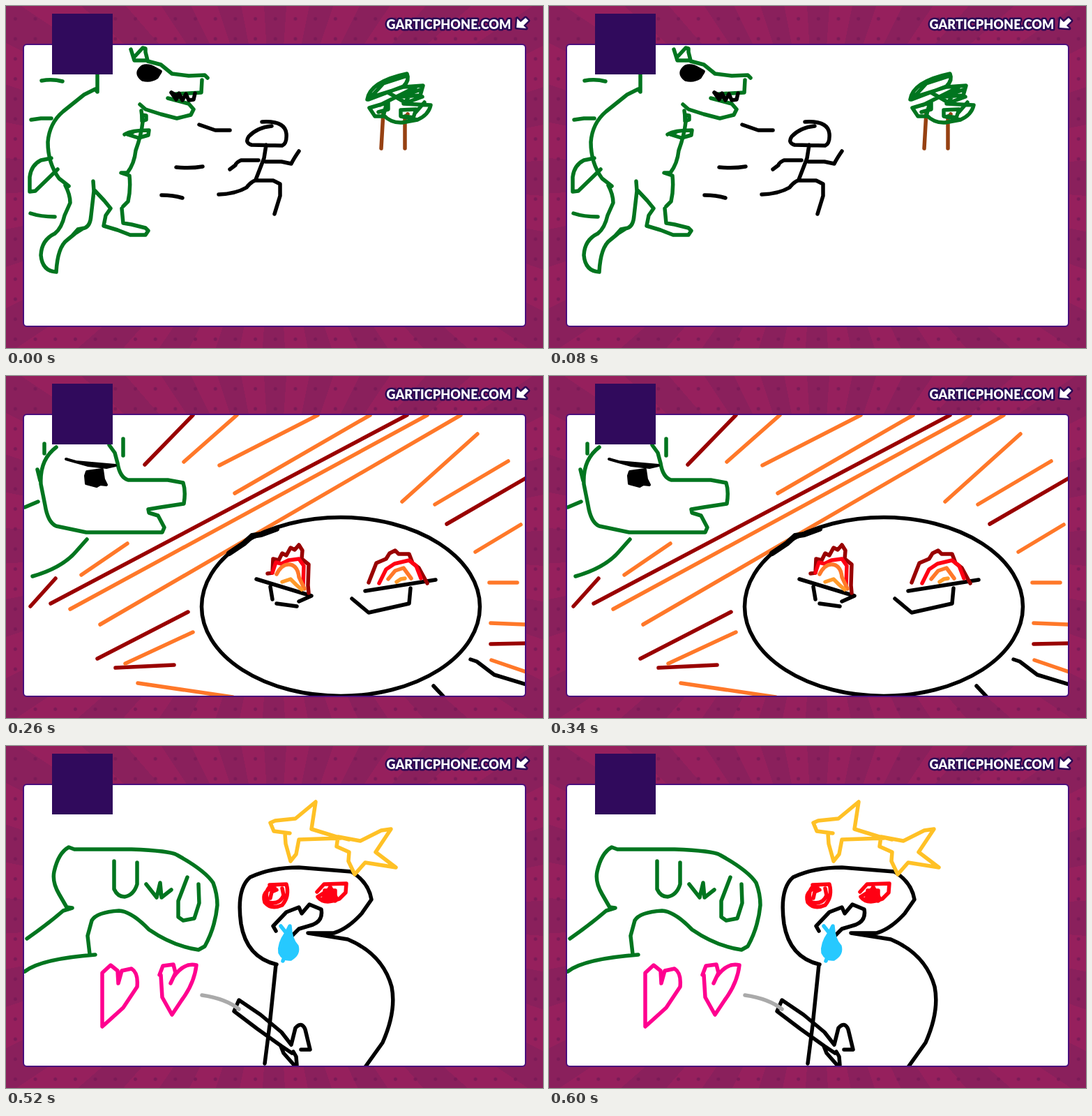
Animation of 770 by 490 pixels, one loop 650 ms. Source, as an HTML page:

```html
<!DOCTYPE html>
<html lang="en">
<head>
<meta charset="utf-8">
<title>Flipbook chase</title>
<style>
html, body { margin: 0; width: 770px; height: 490px; overflow: hidden; }
body {
  background:
    radial-gradient(circle, #7a1b57 2px, transparent 3px) -1px 4px / 28.7px 28.7px,
    repeating-conic-gradient(from 4deg at 50% 50%, #96205d 0 7.5deg, #8a205c 7.5deg 15deg);
}
svg { display: block; }
text { font: 900 18px Lato, sans-serif; letter-spacing: .1px; }
.badge { fill: #fff; stroke: #2b0a55; stroke-width: 5; stroke-linejoin: round; paint-order: stroke; }
.scene { display: none; fill: none; stroke-width: 5.5; stroke-linecap: round; stroke-linejoin: round; }
.scene.on { display: inline; }
.green { stroke: #01751f; }
.black { stroke: #000; }
.brown { stroke: #964112; }
.maroon { stroke: #990000; }
.orange { stroke: #ff7829; }
.red { stroke: #ff0013; }
.amber { stroke: #ffc126; }
.pink { stroke: #ff008f; }
.cyan { stroke: #26c9ff; fill: #26c9ff; }
.gray { stroke: #aaa; }
.ink { fill: #000; }
</style>
</head>
<body>
<svg width="770" height="490" viewBox="0 0 770 490">
<clipPath id="page"><rect x="26" y="56" width="718" height="402" rx="4"/></clipPath>
<rect x="25" y="55" width="720" height="404" rx="5" fill="#fff" stroke="#4a0f7c" stroke-width="2"/>

<g clip-path="url(#page)">

<!-- the chase -->
<g class="scene">
  <path class="green" d="M51 107Q66 104 81 108M36 163L50 161H65M35 297Q50 302 70 302"/>
  <path class="green" d="M131 95V123L128 119L112 127L82 151Q62 168 60 195Q60 225 76 247L90 258M85 257Q92 270 92 282L84 300Q80 318 70 326Q51 335 50 357Q52 380 72 381Q74 345 88 335L99 326L110 319M95 329L103 320L113 318Q121 315 122 300L126 265L125 251M126 263L141 279L150 290L143 300L140 315L160 321L178 328H200L204 322L200 318L180 313L168 311L166 290M168 287L175 280Q179 263 177 243L165 239L174 239Q184 226 186 207Q194 185 196 166L194 150"/>
  <path class="green" d="M179 62L184 78H203L200 66V61L196 60L184 73M203 79L222 84L238 97L262 100L285 99L289 103M281 106L280 124L244 126M232 132L262 140L269 148L265 156L245 161L222 155L200 148L192 141"/>
  <path class="green" d="M195 156L201 157V163L195 165ZM170 184Q180 178 205 178L204 185L190 189L174 184L182 181M65 218L50 221Q36 228 34 245V266L42 265L74 234"/>
  <path class="black ink" d="M196 87Q204 84 214 90L221 94L216 102Q207 108 196 105Q184 96 196 87Z"/>
  <path class="black" d="M237 124L244 134L248 125L253 135L258 126L262 135L269 134L271 125M237 124L250 131M277 170L300 178H321M244 231Q265 233 282 230M223 271Q240 271 253 275"/>
  <path class="black" d="M367 166Q400 164 402 183Q403 197 396 200L352 199Q342 196 348 187Q360 174 381 172M373 199L370 218L358 249M362 221H337Q330 224 329 228L321 234M372 223H395L409 226Q413 218 420 208M385 298L393 272V255L383 250H357Q350 253 345 260Q330 269 305 270"/>
  <path class="brown" d="M541 152L538 204M576 155L572 160V204"/>
  <path class="green" d="M518 134Q522 108 575 97Q579 106 570 115L520 134L541 111L572 101M522 131L570 116L598 114L594 128L566 130L594 120M536 142L588 116L572 138L548 124M597 130L570 140L609 142Q606 156 590 163L566 158V149L588 148L584 160L572 158M600 138L586 154M521 146L548 138V148L534 152M521 146L529 158H541L545 142M541 156Q552 168 568 167L590 163"/>
</g>

<!-- the stop -->
<g class="scene">
  <path class="brown" d="M27 387L65 381Q100 390 150 389C190 385 200 366 250 365Q285 374 310 375L335 371M478 369L523 355H590C620 360 640 378 665 379L708 380Q725 378 738 367"/>
  <path class="green" d="M54 107Q68 103 82 108M37 165L68 161M32 290Q36 304 47 304H69M65 219Q36 222 36 250V264Q54 264 65 240"/>
  <path class="green" d="M129 95V125L90 136Q64 152 63 170Q60 205 67 225L78 249L95 282M90 278L83 306Q80 324 66 332Q44 340 46 355Q50 372 67 381Q70 365 82 345L119 312Q122 300 124 280L129 253L133 268L141 283L152 293L138 302L136 314Q140 321 150 322L203 327Q203 321 196 319L165 309V289Q177 275 177 260L163 236Q184 209 192 194Q201 178 200 158L194 143"/>
  <path class="green" d="M194 143L201 150Q220 158 243 160L264 159L270 150Q270 138 258 136L236 131Q234 126 244 125L281 124L288 97L262 90L241 91L226 84L205 79L200 58L184 74M179 64L184 79L205 78M193 181H205L208 178H219L223 195L216 202L188 197"/>
  <path class="black ink" d="M185 92L195 89L210 86L207 92L211 98L210 112L204 117H192L185 110Z"/>
  <path class="black" d="M386 206L399 256M427 201V249M465 206L453 261M424 271Q393 270 394 293Q397 309 426 310Q442 310 446 300L455 282Q455 271 424 271M418 315L414 365L410 390M371 317L376 326L375 338H450Q464 330 464 315M385 436L384 420Q386 395 408 393Q432 398 434 420L437 436"/>
  <path class="brown" d="M580 211L595 271M621 211L623 250L632 271"/>
  <path class="green" d="M578 216L562 205Q553 190 558 173Q570 160 582 175L587 190L578 215M564 200V178L574 178L580 203M570 205L568 185M585 193V175Q600 155 611 165L609 190M586 200Q600 200 598 178M608 194Q605 162 655 159Q665 168 662 190L646 208L630 214L611 203L608 194M612 202L656 196M613 180L635 181L652 174L645 190L628 185L650 182M618 208L648 204L657 175M606 196L650 198"/>
</g>

<!-- the glare -->
<g class="scene">
  <path class="maroon" d="M199 127L268 56M64 326L575 56M35 330L71 290M131 405L261 338M157 418L241 414M632 212L746 146M695 384L746 383"/>
  <path class="orange" d="M255 123L331 56M306 128L447 56M328 168L522 56M92 334L604 56M135 356L652 56M108 285L174 240M171 412L268 367M189 440L325 460M568 180L676 83M615 184L720 122M673 252L738 213M693 296H733M695 354L746 356M696 407L746 424"/>
  <path class="green" d="M55 97V111M168 90V114M45 134L49 150M72 102Q48 120 50 155L56 185Q60 210 72 215L115 224H224L227 217L218 200L205 196L204 191L222 188L255 183Q258 165 254 153L232 149H175Q163 145 160 125L156 110L148 99M27 188L46 180M38 287Q80 275 100 252L116 234"/>
  <path class="black ink" stroke-width="4" d="M86 119L100 123L157 128L144 131L118 128ZM116 137L138 134L140 148L144 156L135 155L130 158L115 154L114 143Z"/>
  <ellipse class="black" cx="480" cy="330.500" rx="199.500" ry="128"/>
  <path class="black" stroke-width="8" d="M320 254L341 240L353 229L366 227L388 219"/>
  <path class="black" d="M359 291L438 315L420 323M379 302L382 320M388 326L417 330M515 308L616 292M496 319L520 339L578 326L580 304M666 406L675 409L700 428L746 442M613 444L628 460"/>
  <path class="maroon" d="M375 283L382 282L383 262L391 264L396 254L402 257L408 246L414 249L420 242L425 250L424 262L434 270L433 300L434 311M520 296L531 268L545 262L550 254L558 250L563 255L578 255L583 268L592 275L604 297"/>
  <path class="red" d="M382 282L387 267L395 269L405 264L420 262L427 272L426 300M535 297L545 277L557 269L578 264L588 272L595 290"/>
  <path class="orange" d="M388 284Q395 270 405 270Q418 270 420 288L428 305M548 291L558 279L570 275L581 290"/>
  <path stroke="#ff9a2a" d="M396 295L408 291L416 299L424 306M560 295L566 291L572 290"/>
</g>

<!-- the blast -->
<g class="scene">
  <path class="orange" d="M183 78Q240 65 330 64H746M219 153Q260 146 300 146H409M268 172C350 150 450 148 500 148H700M294 435Q400 390 546 375M100 102L102 103"/>
  <path class="maroon" d="M168 148C230 110 330 98 400 98L488 97M295 175C380 145 480 133 560 132H646M281 313Q288 305 331 305M227 366H405L436 370M195 429Q245 440 290 460M265 421Q310 424 353 440"/>
  <path class="black" d="M648 194C600 185 500 172 440 174Q412 174 388 186L345 211Q330 225 330 250Q335 270 363 289L440 324L510 360L553 377L570 379H620Q640 370 638 345L644 300L666 250Q670 232 665 205Q655 195 640 193M379 328L383 365L382 402L374 430L370 460M648 328L632 368Q612 390 605 420L598 460M452 329L458 316L505 302L519 322L544 283L550 306L559 293L573 317L585 313L590 326M478 341L487 333L500 332L516 355L538 327L552 318L557 331L585 325L610 337L621 326"/>
  <path class="green" d="M84 240Q70 215 72 185Q78 155 92 149H130C175 160 230 215 255 238Q272 255 272 275Q270 310 250 345Q240 364 208 367H187Q176 362 168 350L150 322L125 272L116 253L104 235L92 223M31 276L60 254L84 240M31 324L50 315Q75 300 111 292"/>
  <path class="green" d="M130 194V238L136 260L155 263L160 245L171 205M174 238L173 275L182 297L189 272L195 294L200 285L205 262M223 269Q212 300 218 322Q226 334 231 322L237 300L242 274"/>
  <path class="pink" fill="#ff008f" d="M73 337Q78 334 81 343Q90 332 92 344Q90 353 82 354Q73 350 73 337ZM109 342Q116 338 121 347Q132 334 135 348Q132 359 122 359Q110 355 109 342Z"/>
  <path class="red" d="M341 195C380 150 470 142 513 141M421 228Q422 195 435 180L449 167Q455 163 460 175Q475 190 480 250M445 218L449 190L462 178L488 238M440 190Q470 165 490 175Q508 185 506 222M582 242L600 185Q603 160 613 153Q640 160 645 185L649 232M612 205Q606 130 622 122Q636 115 641 150L650 230"/>
  <path class="orange" d="M396 213Q410 195 479 190M438 208Q442 170 480 172Q520 172 523 215L518 265L510 270M465 190L494 248M596 242L625 205L643 178M615 225L632 205L645 215M651 250Q656 280 649 300"/>
  <path class="amber" d="M432 226L470 198L466 225L470 248M440 215L460 208L468 220M653 222L620 226Q605 235 617 250M620 224L633 232L630 252L618 240"/>
</g>

<!-- the aftermath -->
<g class="scene">
  <path class="green" d="M95 232L87 231L76 212Q66 195 69 180Q75 153 90 145L98 148H180Q235 150 245 156Q285 178 297 196Q303 212 303 228Q300 260 285 287L276 292Q240 287 205 263Q180 237 162 236Q130 238 123 250L117 272L120 298M30 276Q60 255 82 236L95 232M27 323Q50 305 128 299"/>
  <path class="green" d="M155 165V205Q160 216 170 216Q183 214 188 198V167M201 198L216 217L221 196L223 217L237 206M260 188L247 222V245L254 250L270 247L277 225L276 198"/>
  <path class="pink" d="M138 402V325L150 314L160 322L161 340L166 322L180 319Q190 325 188 345L168 375L147 394ZM220 328L225 315L240 313L243 325L236 340M241 330Q255 310 273 314Q270 340 252 364L238 385L224 360L222 328"/>
  <path class="black" d="M388 313Q345 303 337 255Q330 205 350 188Q380 174 420 174L495 180Q520 195 524 220L510 240Q490 262 470 268H433L490 277Q540 298 553 345Q560 380 540 425L515 460M387 313L378 400L371 455M410 440L395 430L360 405L327 380L334 364L365 385L395 410L409 428L415 404Q424 394 429 406L436 435H423M394 430L398 440L413 457H417L416 445L412 438"/>
  <path class="gray" d="M281 357Q315 362 334 377"/>
  <path class="black" d="M387 265L383 258L402 238L420 231L424 240L435 227L452 234Q455 250 440 256L420 262L410 272"/>
  <path class="cyan" d="M394 258L402 268Q391 284 393 296Q398 306 408 305Q420 298 417 287Q408 278 407 258L402 268M397 308L399 303"/>
  <path class="red" d="M378 199L402 198Q407 215 396 228Q380 235 371 224Q366 208 385 202M377 203Q370 212 376 224Q392 228 398 214L396 204M379 218L381 209L388 206M446 209L456 198L488 197L487 210L478 219Q456 228 447 216L466 204L474 218M456 216L465 202L472 222L454 219"/>
  <path class="red" fill="#ff0013" d="M457 207H472V219L459 220Z"/>
  <path class="amber" d="M407 125L384 122L379 110L386 107L415 104L444 80L438 119L480 132L420 134L416 155L408 165L401 140L400 126M476 130L508 136L538 121L552 119L530 152L559 174L515 167L500 184L491 165L492 152L474 144L476 130L492 134"/>
</g>
</g>

<rect x="66" y="11" width="87" height="87" fill="#300a5c"/>
<text class="badge" x="635" y="33" text-anchor="middle">GARTICPHONE.COM</text>
<path class="badge" d="M733 18L732 31L746 32L742 28L749 21L745 17L738 23Z"/>
</svg>
<script>
const SCENE_MS = 130;
const scenes = [...document.querySelectorAll('.scene')];

function render() {
  const current = Math.floor(performance.now() / SCENE_MS) % scenes.length;
  scenes.forEach((scene, i) => scene.classList.toggle('on', i === current));
  requestAnimationFrame(render);
}
render();
</script>
</body>
</html>
```
